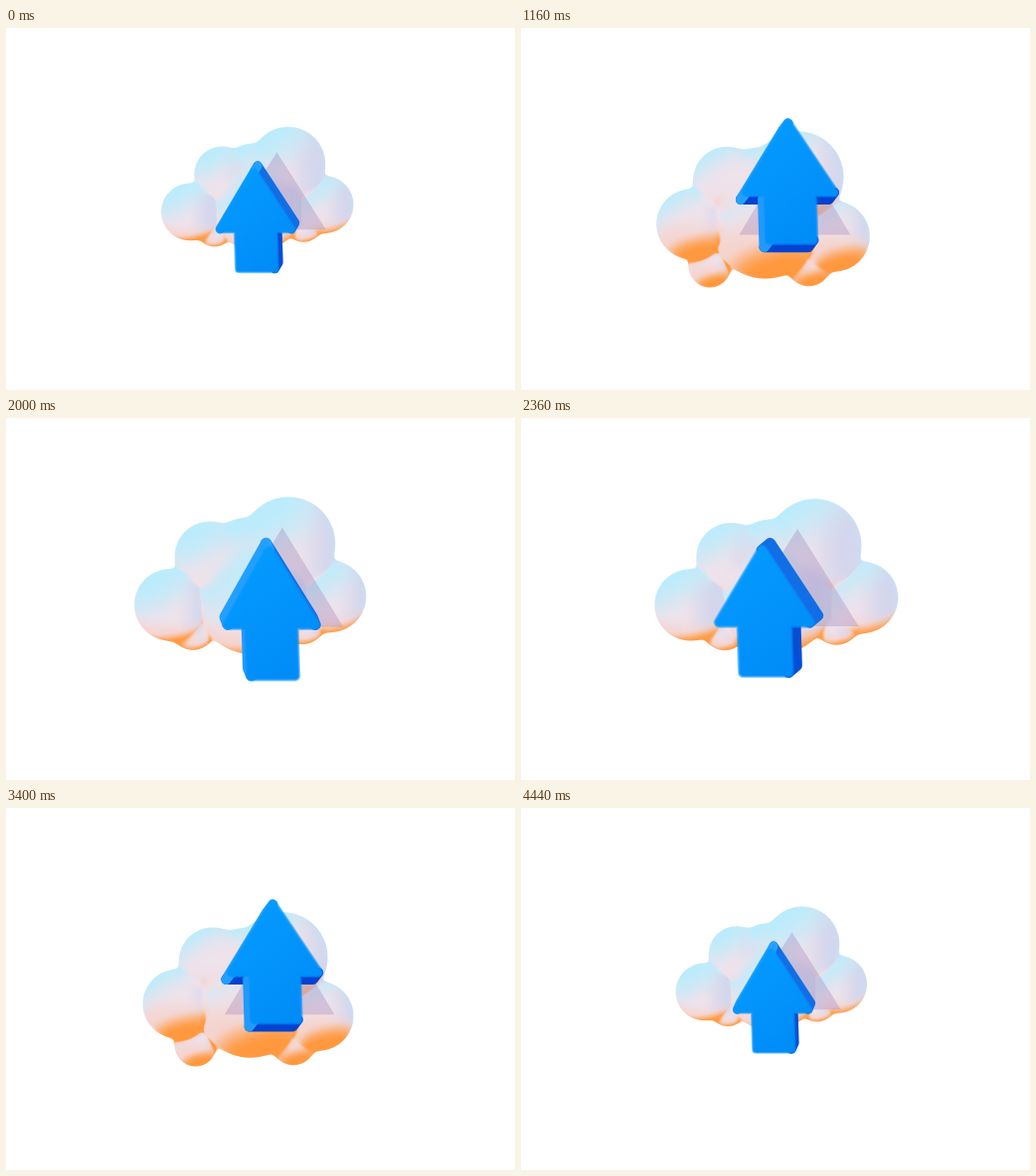
An HTML page with a canvas for the animation above (4480 ms loop, 512 by 365 pixels).

```html
<!DOCTYPE html>
<html lang="en">
<head>
<meta charset="utf-8">
<title>Cloud upload</title>
<style>
  html, body { margin: 0; width: 100%; height: 100%; overflow: hidden; background: #fff; }
  canvas { display: block; width: 100vw; height: 100vh; }
</style>
</head>
<body>
<canvas id="stage" width="512" height="365"></canvas>
<script>
const W = 512, H = 365, CX = 250, CY = 177;
const LOOP = 4480, SWAY = 2240, STEP = 40;
const UNIT = 50;    // pixels per unit of depth
const ROUND = 4.5;  // corner radius of the arrow
const FILLET = .4;  // sharpness of the joins between lobes

const ctx = document.getElementById('stage').getContext('2d');
const layer = document.createElement('canvas');
layer.width = W;
layer.height = H;
const cloudCtx = layer.getContext('2d');
const box = { x: 115, y: 70, w: 275, h: 205 };
const image = cloudCtx.createImageData(box.w, box.h);

const lobes = [
  { x: -67, y: 14, z: -.25, r: 30 },
  { x: -35, y: -26, z: -.3, r: 29 },
  { x: -6, y: -30, z: -.4, r: 26 },
  { x: 30, y: -33, z: -.5, r: 39 },
  { x: 65, y: 16, z: -.75, r: 30 },
  { x: 43, y: 39, z: -.85, r: 19 },
  { x: -46, y: 43, z: -.75, r: 18 },
  { x: 0, y: 12, z: -.4, r: 46 }
];

const HEAD = 38, SHAFT = 19, TIP = -53, NECK = 9, FOOT = 52;
const arrow = [[0, TIP], [HEAD, NECK], [SHAFT, NECK], [SHAFT, FOOT],
  [-SHAFT, FOOT], [-SHAFT, NECK], [-HEAD, NECK]];

const color = {
  base: [238, 226, 235], right: [206, 210, 236], sky: [186, 236, 252],
  peach: [247, 208, 198], orange: [255, 152, 62],
  sideDark: [0, 62, 205], sideLight: [35, 160, 255]
};

const clamp = v => Math.max(0, Math.min(1, v));
const ease = (a, b, v) => { const k = clamp((v - a) / (b - a)); return k * k * (3 - 2 * k); };
const mix = (a, b, k) => a.map((v, i) => v + (b[i] - v) * k);
const rgb = c => `rgb(${c.map(Math.round)})`;

// The view circles around the object: near things slide by (ux, uy) per unit of depth.
function viewAt(t) {
  const a = 2 * Math.PI * t / SWAY, c = Math.cos(a), s = Math.sin(a);
  return {
    ux: -7.6 * c - 17.5 * s,
    uy: 18.5 * c - 4.9 * s,
    wide: .99 - .045 * c + .04 * s,
    tall: 1.03 - .03 * c - .07 * c * c,
    near: 1 - .04 * c,
    zoom: 1.125 - .125 * Math.cos(2 * Math.PI * t / LOOP)
  };
}

function cloudColor(nx, ny, nz, y, view) {
  const ox = nx - view.ux / UNIT * nz;
  const oy = ny - view.uy / UNIT * nz;
  const lower = ease(-25, 45, y);
  const warm = oy + .25 * ox;
  const rim = (1 - nz) ** 2 * .5 * (1 - ease(0, .5, oy));
  let c = mix(color.base, color.right, ease(0, .9, ox) * .8);
  c = mix(c, color.sky, Math.max(rim, ease(-.1, 1, -.75 * oy - .45 * ox)));
  c = mix(c, color.peach, ease(0, .7, oy) * .8 * lower);
  return mix(c, color.orange, ease(.5, 1, warm) * lower);
}

function renderCloud(view) {
  const balls = lobes.map(b => ({
    x: b.x + b.z * view.ux,
    y: b.y * view.tall + b.z * view.uy,
    z: b.z * UNIT,
    r: b.r * view.near
  }));
  image.data.fill(0);
  for (let j = 0; j < box.h; j++) {
    for (let i = 0; i < box.w; i++) {
      const x = (box.x + i + .5 - CX) / view.zoom;
      const y = (box.y + j + .5 - CY) / view.zoom;
      let field = 0, nx = 0, ny = 0, nz = 0;
      for (const b of balls) {
        const dx = x - b.x, dy = y - b.y, d = Math.hypot(dx, dy), gap = d - b.r;
        if (gap > 14) continue;
        field += Math.exp(-FILLET * gap);
        const lift = gap < 0 ? Math.sqrt(b.r * b.r - d * d) : 0;
        const weight = Math.exp((b.z + lift - 4 * Math.max(0, gap)) / 8);
        const size = Math.max(d, b.r);
        nx += weight * dx / size;
        ny += weight * dy / size;
        nz += weight * lift / b.r;
      }
      const alpha = clamp(.5 + Math.log(field) / FILLET * view.zoom);
      if (!alpha) continue;
      const len = Math.hypot(nx, ny, nz) || 1;
      const c = cloudColor(nx / len, ny / len, nz / len, y, view);
      image.data.set([...c, alpha * 255], (j * box.w + i) * 4);
    }
  }
  cloudCtx.setTransform(1, 0, 0, 1, 0, 0);
  cloudCtx.clearRect(0, 0, W, H);
  cloudCtx.putImageData(image, box.x, box.y);
}

function trace(c, pts, paint, radius) {
  c.beginPath();
  pts.forEach(p => c.lineTo(...p));
  c.closePath();
  c.fillStyle = c.strokeStyle = paint;
  c.lineWidth = 2 * radius;
  c.lineJoin = 'round';
  c.fill();
  c.stroke();
}

// Shadow of the arrow head, cast to the right on the cloud only.
function castShadow(view) {
  const head = [arrow[0], arrow[1], arrow[6]];
  const pts = head.map(([x, y]) => [8.5 + x * 1.3 + 14, (y * 1.35 + 16) * view.tall]);
  cloudCtx.setTransform(view.zoom, 0, 0, view.zoom, CX, CY);
  cloudCtx.globalCompositeOperation = 'source-atop';
  trace(cloudCtx, pts, 'rgba(0,0,0,0)', 0);
  cloudCtx.globalAlpha = .3;
  cloudCtx.fillStyle = 'rgb(150,120,175)';
  cloudCtx.fill();
  cloudCtx.globalAlpha = 1;
  cloudCtx.globalCompositeOperation = 'source-over';
}

function drawArrow(view) {
  const front = arrow.map(([x, y]) => [
    8.5 + view.ux + x * view.wide + y * .03,
    -1 + view.uy + y * view.tall
  ]);
  const ex = -.5 * view.ux, ey = -.35 * view.uy;
  const push = ([x, y]) => [x + ex, y + ey];

  const sides = front.map((p, i) => {
    const q = front[(i + 1) % front.length];
    const len = Math.hypot(q[0] - p[0], q[1] - p[1]);
    const nx = (q[1] - p[1]) / len, ny = (p[0] - q[0]) / len;
    return { pts: [p, q, push(q), push(p)], seen: nx * ex + ny * ey > 0, lit: clamp(.55 - .4 * nx - .5 * ny) };
  });
  sides.filter(s => s.seen).sort((a, b) => a.lit - b.lit).forEach(s =>
    trace(ctx, s.pts, rgb(mix(color.sideDark, color.sideLight, s.lit)), ROUND));

  const face = ctx.createLinearGradient(front[6][0], front[0][1], front[1][0], front[3][1]);
  face.addColorStop(0, 'rgb(4,156,255)');
  face.addColorStop(1, 'rgb(0,138,247)');
  // The face fades in over its rounded edge.
  for (let k = 0; k < 4; k++) {
    ctx.globalAlpha = .45 + .18 * k;
    trace(ctx, front, face, ROUND - k * .8);
  }
  ctx.globalAlpha = 1;
}

function draw(t) {
  const view = viewAt(t);
  renderCloud(view);
  castShadow(view);
  ctx.setTransform(1, 0, 0, 1, 0, 0);
  ctx.fillStyle = '#fff';
  ctx.fillRect(0, 0, W, H);
  ctx.drawImage(layer, 0, 0);
  ctx.setTransform(view.zoom, 0, 0, view.zoom, CX, CY);
  drawArrow(view);
}

let start, shown;
function tick(now) {
  start ??= now;
  const t = Math.floor((now - start) % LOOP / STEP) * STEP;
  if (t !== shown) draw(shown = t);
  requestAnimationFrame(tick);
}
draw(shown = 0);
requestAnimationFrame(tick);
</script>
</body>
</html>
```
